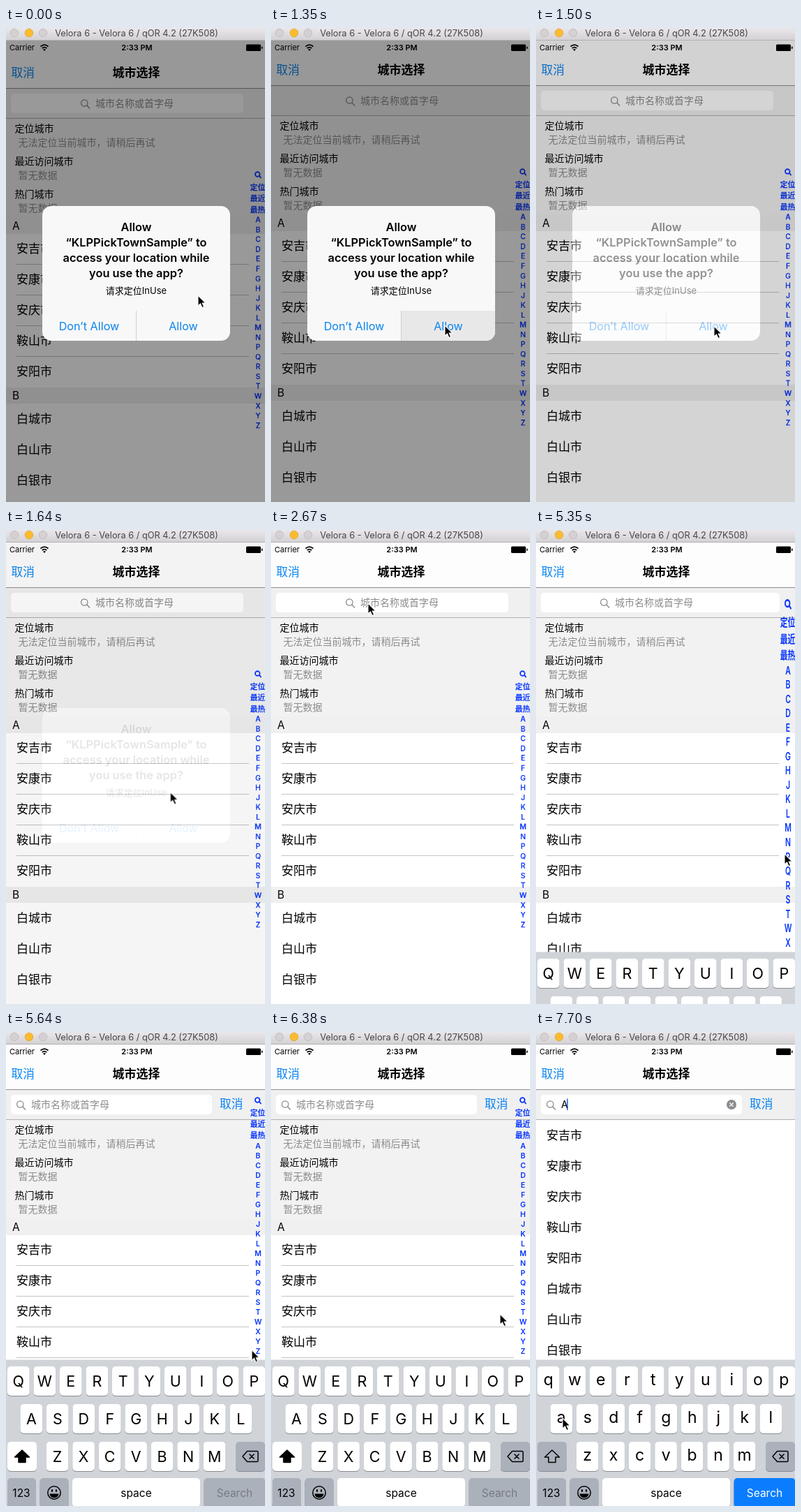
Recreate the animation shown at these times as an HTML page. Size 371 px wide and 679 px high, loop 7990 ms.

```html
<!DOCTYPE html>
<html lang="zh">
<head>
<meta charset="utf-8">
<title>City picker</title>
<style>
html, body { margin: 0; width: 100%; height: 100%; overflow: hidden; background: #fff; }
svg { display: block; width: 371px; height: 679px; }
text { font-family: Inter, "Noto Sans CJK SC", "Noto Sans CJK JP", "Noto Sans CJK", sans-serif; white-space: pre; }
.mid { text-anchor: middle; }
.bold { font-weight: 600; }
.blue { fill: #0a84f0; }
.gray { fill: #8c8c8e; }
.line { stroke: #c4c4c6; }
.key { fill: #fff; }
.fn { fill: #abb1bb; }
.lens { fill: none; stroke: #86868a; stroke-width: 1.2; }

.anim { animation: 7990ms step-end infinite; }
#app { animation-name: settle; }
#fade { animation-name: fade; }
#press { animation-name: press; }
#field { animation-name: field; }
#hint, #lens { animation-name: hint; }
#hint { animation-name: hint, before; }
#cancel { animation-name: cancel; }
#index { animation-name: index, before; transform-origin: 0 81px; }
#keyboard { animation-name: rise; }
#pointer { animation-name: point; }
.typed { animation-name: typed; }
.caps { animation-name: caps; }
.lower { animation-name: lower; }

@keyframes settle {
  0% { transform: translateY(4px); }
  1.877% { transform: translateY(3px); }
  3.754% { transform: translateY(2px); }
  5.632% { transform: translateY(1px); }
  7.509%, 100% { transform: none; }
}
@keyframes fade {
  0% { opacity: 1; }
  18.773% { opacity: .43; }
  20.525% { opacity: .1; }
  22.402%, 100% { opacity: 0; }
}
@keyframes press {
  0% { opacity: 0; }
  16.896% { opacity: 1; }
  18.773%, 100% { opacity: 0; }
}
@keyframes field {
  0% { width: 333px; opacity: 1; }
  7.509% { width: 333px; opacity: 0; }
  18.773% { width: 333px; opacity: 1; }
  66.958% { width: 342px; opacity: 1; }
  68.836% { width: 301px; opacity: 1; }
  70.588%, 100% { width: 288px; opacity: 1; }
}
@keyframes hint {
  0% { transform: none; }
  66.958% { transform: translateX(-15px); }
  68.836% { transform: translateX(-74px); }
  70.588%, 100% { transform: translateX(-92px); }
}
@keyframes cancel {
  0% { opacity: 0; transform: translateX(63px); }
  68.836% { opacity: .8; transform: translateX(13px); }
  70.588%, 100% { opacity: 1; transform: none; }
}
@keyframes index {
  0% { transform: none; }
  66.958% { transform: scaleY(1.465) translateY(-108px); }
  68.836% { transform: scaleY(1.11) translateY(-108px); }
  70.588%, 100% { transform: translateY(-108px); }
}
@keyframes rise {
  0% { transform: translateY(216px); }
  66.958% { transform: translateY(135px); }
  68.836% { transform: translateY(25px); }
  70.588%, 100% { transform: none; }
}
@keyframes before { 0% { opacity: 1; } 85.481%, 100% { opacity: 0; } }
@keyframes typed { 0% { opacity: 0; } 85.481%, 100% { opacity: 1; } }
@keyframes caps { 0% { opacity: 1; } 87.234%, 100% { opacity: 0; } }
@keyframes lower { 0% { opacity: 0; } 87.234%, 100% { opacity: 1; } }
@keyframes point {
  0% { transform: translate(275px, 383px); }
  1.877% { transform: translate(275px, 383px); animation-timing-function: steps(4, start); }
  9.386% { transform: translate(249px, 426px); }
  18.773% { transform: translate(255px, 427px); }
  20.525% { transform: translate(255px, 427px); animation-timing-function: steps(6, start); }
  31.539% { transform: translate(137px, 118px); animation-timing-function: steps(2, start); }
  35.294% { transform: translate(139px, 105px); }
  57.822% { transform: translate(139px, 105px); animation-timing-function: steps(6, start); }
  68.773% { transform: translate(356px, 464px); animation-timing-function: steps(7, start); }
  81.676% { transform: translate(328px, 404px); animation-timing-function: steps(3, start); }
  87.234%, 100% { transform: translate(38px, 553px); }
}
</style>
</head>
<body>
<svg viewBox="0 0 371 679">
  <defs>
    <linearGradient id="chrome" x2="0" y2="1">
      <stop stop-color="#e9e7e9"/><stop offset="1" stop-color="#d3d1d3"/>
    </linearGradient>
    <clipPath id="card"><rect x="52" y="255" width="269" height="193" rx="13"/></clipPath>
  </defs>
  <rect width="371" height="679" fill="#fff"/>

  <g id="app" class="anim">
    <g id="list"></g>
    <g id="results" class="anim typed"></g>
    <rect y="14" width="371" height="68" fill="#fdfdfd"/>
    <g id="nav"></g>
    <rect y="83" width="371" height="42" fill="#f0f0f1"/>
    <path d="M0 82.5H371" stroke="#8f8f91"/>
    <path d="M0 125.5H371" stroke="#b0b0b2"/>
    <rect id="field" class="anim" x="7" y="90" width="333" height="28" rx="5" fill="#fff"/>
    <g id="lens" class="anim"><path class="lens" d="M116 107L120 111.500M117 103.500a4.700 4.700 0 1 0-9.400 0a4.700 4.700 0 1 0 9.400 0"/></g>
    <g id="hint" class="anim"></g>
    <g id="cancel" class="anim"></g>
    <g id="entry" class="anim typed">
      <path d="M45 95.500V112" stroke="#2f62e8" stroke-width="1.600"/>
      <circle cx="280" cy="104" r="7" fill="#8a8a8f"/>
      <path d="M277.300 101.300l5.400 5.400m0-5.400l-5.400 5.400" stroke="#fff" stroke-width="1.300"/>
    </g>
    <g id="index" class="anim" fill="#0433ff"></g>
  </g>

  <g id="status">
    <g fill="none" stroke="#000" stroke-width="1.700">
      <path d="M49.500 26.500q5.500-4.600 11 0M51.700 29q3.300-2.700 6.600 0"/>
    </g>
    <path d="M53 30.800q2-1.500 4 0l-2 2.200z"/>
    <rect x="344" y="23.500" width="21" height="9.500" rx="1.500"/>
    <rect x="366" y="26.500" width="1.500" height="3.500" rx=".7"/>
  </g>

  <g id="keyboard" class="anim">
    <rect y="469.500" width="371" height="220" fill="#d0d4d9"/>
    <g id="keys"></g>
    <g id="caps" class="anim caps"></g>
    <g id="lower" class="anim lower"></g>
    <g fill="none" stroke="#000" stroke-width="1.500" stroke-linejoin="round">
      <path d="M339 608l6.500-7.500h14q1.500 0 1.500 1.500v12q0 1.500-1.500 1.500h-14zM348.500 604.500l7 7m0-7l-7 7"/>
      <circle cx="69" cy="660" r="9.200"/>
    </g>
    <path d="M62.500 661.500h13q-.8 5.800-6.500 5.800t-6.500-5.800z"/>
    <ellipse cx="66" cy="657" rx="1.200" ry="2"/><ellipse cx="72" cy="657" rx="1.200" ry="2"/>
  </g>

  <g id="fade" class="anim">
    <rect y="18" width="371" height="661" opacity=".4"/>
    <g clip-path="url(#card)">
      <rect x="52" y="255" width="269" height="193" fill="#f8f8f8"/>
      <rect id="press" class="anim" x="186" y="405" width="135" height="43" fill="#e8e8e8"/>
      <path d="M186.500 405V448" stroke="#d0d0d2"/>
    </g>
    <g id="alert"></g>
  </g>

  <g id="window">
    <rect width="371" height="17" fill="url(#chrome)"/>
    <path d="M0 17.500H371" stroke="#b5b3b5"/>
    <circle cx="12" cy="7" r="5.700" fill="#d5d1d3" stroke="#bdb9bb" stroke-width=".8"/>
    <circle cx="33" cy="7" r="5.700" fill="#fdbc2e" stroke="#dfa023" stroke-width=".8"/>
    <circle cx="53" cy="7" r="5.700" fill="#d5d1d3" stroke="#bdb9bb" stroke-width=".8"/>
  </g>

  <g id="pointer" class="anim">
    <path d="M0 0V15.200L3.500 12L6 17.600L8.700 16.400L6.200 11H11Z" stroke="#fff" stroke-width="1.100"/>
  </g>
</svg>
<script>
const add = (id, ...parts) =>
  document.getElementById(id).insertAdjacentHTML('beforeend', parts.join(''));

// y is the visual centre of the line
const label = (x, y, size, str, cls = '') =>
  `<text x="${x}" y="${y + size * .37}" font-size="${size}" class="${cls}">${str}</text>`;
const box = (x, y, w, h, fill) => `<rect x="${x}" y="${y}" width="${w}" height="${h}" fill="${fill}"/>`;
const rule = y => `<path class="line" d="M15 ${y + .5}H348"/>`;

const aCities = ['安吉市', '安康市', '安庆市', '鞍山市', '安阳市'];
const bCities = ['白城市', '白山市', '白银市'];
const rows = (names, y) => names.map((n, i) => label(15, y + i * 44, 17, n)).join('');

add('window', label(187, 7, 12.8, 'Velora 6 - Velora 6 / qOR 4.2 (27K508)', 'mid')
  .replace('<text', '<text fill="#484648"'));
add('status', label(5, 28, 11, 'Carrier'), label(187.5, 28, 11, '2:33 PM', 'mid bold'));
add('nav', label(7.5, 60, 16.7, '取消', 'blue'), label(186.5, 60, 17, '城市选择', 'mid bold'));

add('list',
  box(0, 126, 371, 141, '#f2f2f2'), box(0, 267, 371, 24, '#f0f0f0'), box(0, 511, 371, 23, '#f0f0f0'),
  ...[['定位城市', '无法定位当前城市，请稍后再试'], ['最近访问城市', '暂无数据'], ['热门城市', '暂无数据']]
    .map(([head, note], i) => label(12.5, 140 + i * 47, 14, head) + label(17.5, 160 + i * 47, 14, note, 'gray')),
  label(9, 279, 15.5, 'A'), rows(aCities, 312),
  ...[334, 378, 422, 466].map(rule),
  label(9, 522.5, 15.5, 'B'), rows(bCities, 556));

add('results', box(0, 126, 371, 560, '#fff'), rows([...aCities, ...bCities], 148));
add('hint', label(128, 104, 14, '城市名称或首字母', 'gray'));
add('cancel', label(306, 103, 16.7, '取消', 'blue'));
add('entry', label(36, 104, 14, 'A'));

add('index',
  '<path d="M362.500 207.500L365.500 211M363.500 205.500a3.300 3.300 0 1 0-6.600 0a3.300 3.300 0 1 0 6.600 0" fill="none" stroke="#0433ff" stroke-width="1.800"/>',
  ...['定位', '最近', '最热'].map((s, i) => label(360.5, 224 + i * 16, 10.8, s, 'mid bold')),
  ...[...'ABCDEFGHJKLMNPQRSTWXYZ'].map((c, i) => label(361, 270.8 + i * 14.02, 10.5, c, 'mid bold')));

// Keyboard
const key = (x, y, w, cls = 'key') =>
  `<rect x="${x}" y="${y + 1}" width="${w}" height="42" rx="5" fill="#888c91"/>` +
  `<rect x="${x}" y="${y}" width="${w}" height="42" rx="5" class="${cls}"/>`;
const lines = [['QWERTYUIOP', 17.8, 479], ['ASDFGHJKL', 36.3, 533], ['ZXCVBNM', 73.6, 587]];
for (const [letters, x0, y] of lines) {
  [...letters].forEach((c, i) => {
    const x = x0 + i * 37.5;
    add('keys', key(x - 15.8, y, 31.6));
    add('caps', label(x, y + 21, 21.5, c, 'mid'));
    add('lower', label(x, y + 18.5, 23, c.toLowerCase(), 'mid'));
  });
}
add('keys', key(329, 587, 42, 'fn'), key(2, 639, 41, 'fn'), key(48.5, 639, 41, 'fn'), key(95, 639, 183),
  label(22, 660, 15.5, '123', 'mid'), label(186.5, 660, 15.5, 'space', 'mid'));

const arrow = fill => `<path d="M23 599L33.500 609H28V616.500H18V609H12.500Z" fill="${fill}" stroke="#000" stroke-width="1.500" stroke-linejoin="round"/>`;
const search = (cls, back, ink) => key(283.5, 639, 88, cls).replace(`class="${cls}"`, `fill="${back}"`) +
  label(327.5, 660, 15.5, 'Search', 'mid').replace('<text', `<text fill="${ink}"`);
add('caps', key(2, 587, 42), arrow('#000'), search('go', '#abb1bb', '#757b84'));
add('lower', key(2, 587, 42, 'fn'), arrow('none'), search('go', '#0a7dff', '#fff'));

add('alert',
  ...['Allow', '“KLPPickTownSample” to', 'access your location while', 'you use the app?']
    .map((s, i) => label(186.5, 285 + i * 22, 16.4, s, 'mid bold')),
  label(186.5, 376, 13, '请求定位InUse', 'mid'),
  label(119, 427, 16.2, 'Don’t Allow', 'mid blue'),
  label(254, 427, 16.2, 'Allow', 'mid blue'));
</script>
</body>
</html>
```
